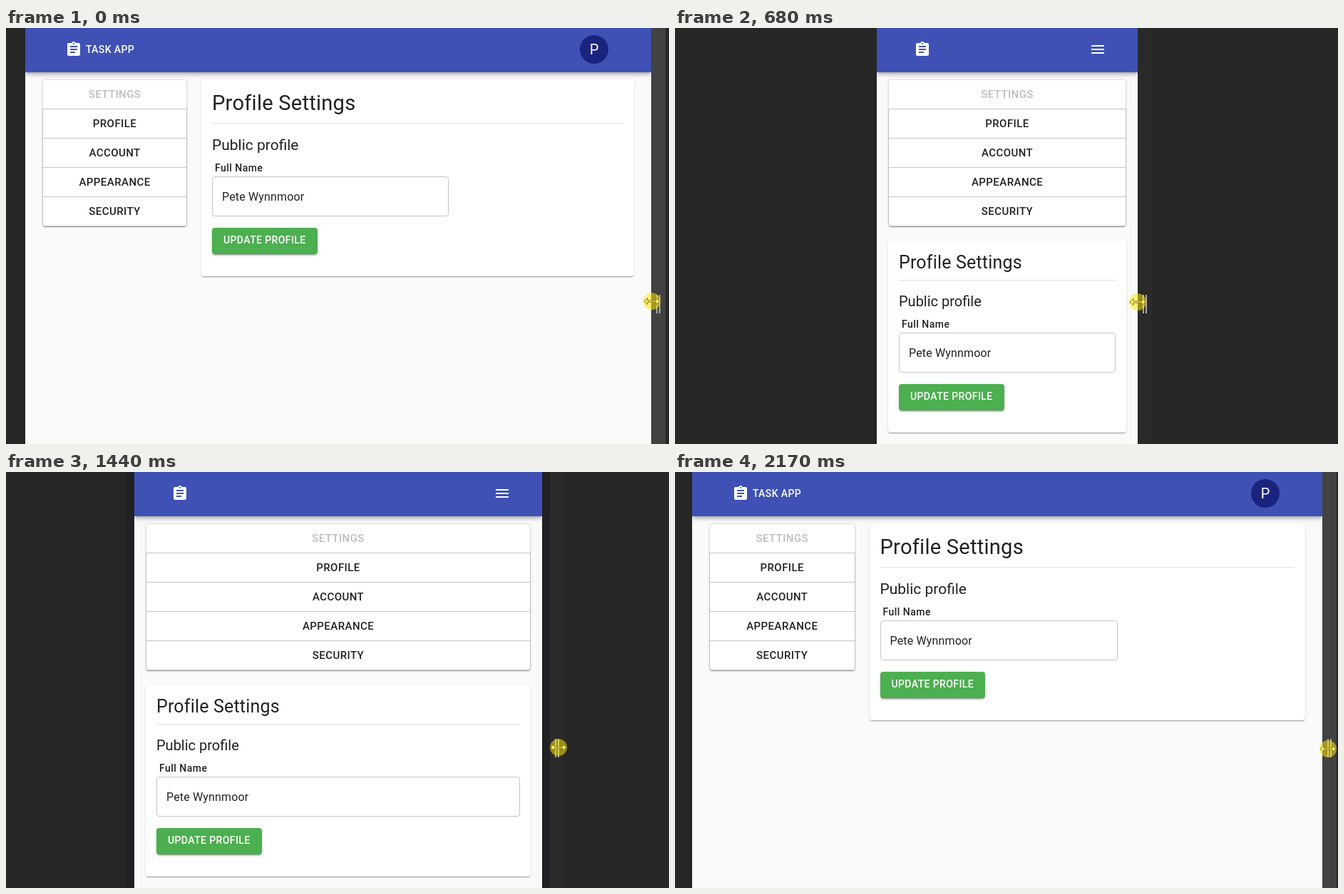
An HTML page for the animation above (2.23 s loop, 930 by 583 pixels).

```html
<!DOCTYPE html>
<html lang="en">
<head>
<meta charset="utf-8">
<title>Responsive settings page</title>
<style>
html, body { margin: 0; width: 100%; height: 100%; overflow: hidden; background: #262626; }
body { position: relative; font-family: Roboto, Arial, sans-serif; color: rgba(0,0,0,.87); }
div, span, svg { position: absolute; box-sizing: border-box; }
span { line-height: 0; white-space: pre; }
#view { top: 0; bottom: 0; background: #202124; }
#page { top: 0; bottom: 0; overflow: hidden; background: #fafafa; }
#bar { left: 0; right: 0; top: 0; height: 62px; background: #3f51b5; color: #fff;
  box-shadow: 0 2px 4px -1px rgba(0,0,0,.2), 0 4px 5px rgba(0,0,0,.14), 0 1px 10px rgba(0,0,0,.12); }
#bar svg { width: 24px; height: 24px; top: 18px; fill: #fff; }
#logo { left: 83px; }
#brand { left: 85px; top: 29.5px; }
.wide #logo { left: 56px; }
.narrow #logo { left: 52px; }
#burger { right: 44px; }
#face { right: 60px; top: 10px; width: 40px; height: 40px; border-radius: 50%; background: #1a237e;
  font-size: 20px; line-height: 40px; text-align: center; }
.wide #burger, .narrow #face, .narrow #brand { display: none; }
.btn { font-size: 14px; font-weight: 500; letter-spacing: .02857em; }
.paper { background: #fff; border-radius: 4px;
  box-shadow: 0 2px 1px -1px rgba(0,0,0,.2), 0 1px 1px rgba(0,0,0,.14), 0 1px 3px rgba(0,0,0,.12); }
#menu { top: 72px; height: 206px; }
.wide #menu { left: 24px; width: calc(25% - 16.5px); }
.narrow #menu { left: 16px; right: 16px; }
#menu div { left: 0; right: 0; height: 42px; line-height: 42px; text-align: center;
  border: 1px solid #c4c4c4; line-height: 40px; font-size: 15px; font-weight: 500; letter-spacing: .02857em; }
#menu div:first-child { border-color: #e0e0e0 #e0e0e0 #c4c4c4; border-radius: 4px 4px 0 0; color: rgba(0,0,0,.26); }
#menu div:last-child { border-radius: 0 0 4px 4px; }
.wide #card { top: 72px; height: 276px; left: calc(25% + 27.5px); right: 24px; --d: 0px; }
.narrow #card { top: 298px; height: 269px; left: 16px; right: 16px; --d: -7px; }
#title { left: 15px; letter-spacing: .00735em; }
.wide #title { top: 33px; font-size: 29.15px; }
.narrow #title { top: 30.5px; font-size: 25px; }
#rule { left: 15px; right: 15px; height: 1px; background: #e0e0e0; }
.wide #rule { top: 61px; }
.narrow #rule { top: 55px; }
#sub { left: 15px; top: calc(92px + var(--d)); }
.wide #sub { font-size: 20.99px; }
.narrow #sub { font-size: 20px; }
#label { left: 19px; top: calc(124px + var(--d)); font-size: 14px; font-weight: 500; letter-spacing: .0333em; }
#field { left: 15px; top: calc(136px + var(--d)); height: 56px; border: 1px solid #c4c4c4; border-radius: 4px; }
.wide #field { right: calc(var(--w) / 2 - 179px); }
.narrow #field { right: 15px; }
#field span { left: 13px; top: 27.5px; font-size: 16px; letter-spacing: .00938em; }
#save { left: 15px; top: calc(208px + var(--d)); width: 147.5px; height: 36.5px; border-radius: 4px;
  background: #4caf50; color: #fff; text-align: center; line-height: 35.5px;
  box-shadow: 0 3px 1px -2px rgba(0,0,0,.2), 0 2px 2px rgba(0,0,0,.14), 0 1px 5px rgba(0,0,0,.12); }
#grip { top: 0; bottom: 0; width: 20px; background: #2a2a2a; }
#grip.lit { background: #424242; }
#grip div { top: 374px; height: 26px; left: 7px; width: 6px; border: solid #a9a9a9; border-width: 0 2px; }
#cursor { width: 24px; height: 24px; }
</style>
</head>
<body>
<div id="view"></div>
<div id="page">
  <div id="menu" class="paper"></div>
  <div id="card" class="paper">
    <span id="title">Profile Settings</span>
    <div id="rule"></div>
    <span id="sub">Public profile</span>
    <span id="label">Full Name</span>
    <div id="field"><span>Pete Wynnmoor</span></div>
    <div id="save" class="btn">UPDATE PROFILE</div>
  </div>
  <div id="bar">
    <svg id="logo" viewBox="0 0 24 24"><path d="M19 3h-4.18C14.4 1.84 13.3 1 12 1s-2.4.84-2.82 2H5c-1.1 0-2 .9-2 2v14c0 1.1.9 2 2 2h14c1.1 0 2-.9 2-2V5c0-1.1-.9-2-2-2zm-7 0c.55 0 1 .45 1 1s-.45 1-1 1-1-.45-1-1 .45-1 1-1zm2 14H7v-2h7v2zm3-4H7v-2h10v2zm0-4H7V7h10v2z"/></svg>
    <span id="brand" class="btn">TASK APP</span>
    <svg id="burger" viewBox="0 0 24 24"><path d="M3 6h18v2H3zM3 11h18v2H3zM3 16h18v2H3z"/></svg>
    <div id="face">P</div>
  </div>
</div>
<div id="grip"><div></div></div>
<svg id="cursor" viewBox="0 0 24 24">
  <path d="M1 12L6 7.5V11H18V7.5L23 12L18 16.5V13H6V16.5Z" fill="#fff" stroke="#000"/>
  <circle cx="12" cy="12" r="12" fill="rgb(255,232,10)" fill-opacity=".53"/>
</svg>
<script>
const LOOP = 2230, MID = 466, BREAK = 600, TICK = 30;
const $ = id => document.getElementById(id);
const [view, page, grip, cursor] = ['view', 'page', 'grip', 'cursor'].map($);

['SETTINGS', 'PROFILE', 'ACCOUNT', 'APPEARANCE', 'SECURITY'].forEach((name, i) => {
  const row = document.createElement('div');
  row.textContent = name;
  row.style.top = i * 41 + 'px';
  $('menu').append(row);
});

// Smooth curve through [time, value] knots that never overshoots.
function curve(knots) {
  const rate = i => (knots[i + 1][1] - knots[i][1]) / (knots[i + 1][0] - knots[i][0]);
  const slope = knots.map((k, i) => {
    if (!i || i === knots.length - 1) return 0;
    const a = rate(i - 1), b = rate(i);
    return a * b <= 0 ? 0 : 2 * a * b / (a + b);
  });
  return t => {
    const last = knots.length - 1;
    if (t <= knots[0][0]) return knots[0][1];
    if (t >= knots[last][0]) return knots[last][1];
    let i = 0;
    while (t >= knots[i + 1][0]) i++;
    const [t0, y0] = knots[i], [t1, y1] = knots[i + 1];
    const h = t1 - t0, s = (t - t0) / h, r = 1 - s;
    return y0 * r * r * (1 + 2 * s) + y1 * s * s * (3 - 2 * s)
      + h * s * r * (slope[i] * r - slope[i + 1] * s);
  };
}

const edgeAt = curve([[30, 905], [410, 748], [560, 685], [680, 649], [910, 613], [1240, 676], [1650, 845], [2170, 908]]);
const mouseX = curve([[30, 906], [410, 731], [560, 672], [680, 649], [910, 614], [1240, 698], [1650, 862], [2170, 916]]);
const mouseY = curve([[0, 383], [410, 383.6], [910, 384], [1240, 385], [1650, 388]]);

// The picture advances in ticks; the last tick before each mark is longer.
const marks = [0, 60, 410, 680, 730, 910, 1240, 1650, 1700, 2170, LOOP];
function step(t) {
  const i = marks.findIndex(m => m > t) - 1;
  const count = Math.floor((marks[i + 1] - marks[i]) / TICK);
  return marks[i] + TICK * Math.min(Math.floor((t - marks[i]) / TICK), count - 1);
}

function span(el, right) {
  const w = 2 * (right - MID);
  el.style.left = MID - w / 2 + 'px';
  el.style.width = w + 'px';
  return w;
}

function draw(now) {
  const t = step(now);
  const right = Math.round(edgeAt(t));
  const outer = Math.max(right, Math.round(edgeAt(t + 22)));
  const w = span(page, right);
  span(view, outer);
  page.style.setProperty('--w', w + 'px');
  page.className = w < BREAK ? 'narrow' : 'wide';
  grip.style.left = outer + 'px';
  grip.className = t < 60 || t >= 2170 ? 'lit' : '';
  cursor.style.left = Math.round(mouseX(t)) - 12 + 'px';
  cursor.style.top = Math.round(mouseY(t)) - 12 + 'px';
}

const start = performance.now();
function loop() {
  draw((performance.now() - start) % LOOP);
  requestAnimationFrame(loop);
}
loop();
</script>
</body>
</html>
```
